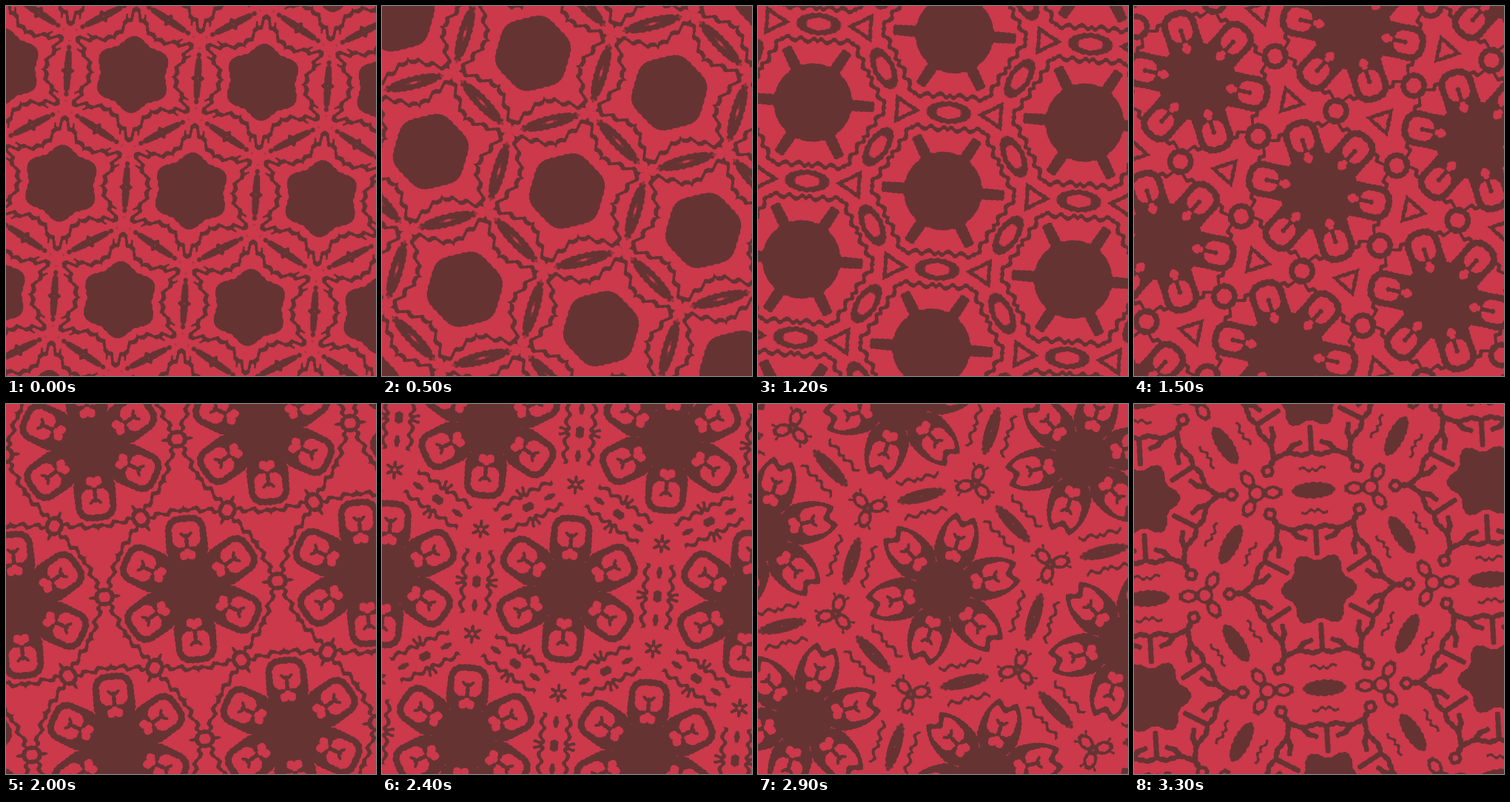
Animation, 500 px wide and 500 px high, one loop 3.4 s. Source, as an HTML page with a canvas:

```html
<!DOCTYPE html>
<html lang="en">
<head>
<meta charset="utf-8">
<title>Kaleidoscope</title>
<style>
html, body { margin: 0; width: 100%; height: 100%; overflow: hidden; background: #cb394b; }
canvas { display: block; width: 100%; height: 100%; }
</style>
</head>
<body>
<canvas id="stage" width="500" height="500"></canvas>
<script>
const SIZE = 500, LOOP = 3400, STEP = 100;
const LIGHT = [203, 57, 75], DARK = [102, 51, 51];
const ROOT3 = Math.sqrt(3), C30 = ROOT3 / 2;

// The mirror wedge is sampled on a grid, in units of the cell size.
const COLS = 180, H = .5 / COLS, W = COLS + 3, ROWS = Math.ceil(.2887 / H) + 3;
const field = new Float32Array(W * ROWS);

const { abs, hypot, max, min, sin, cos } = Math;
const clamp = (v, a, b) => min(b, max(a, v));

// Signed distances, negative inside.
const disc = (x, y, r) => hypot(x, y) - r;
const oval = (x, y, a, b) => (hypot(x / a, y / b) - 1) * min(a, b);
const outline = (d, w) => abs(d) - w / 2;
function box(x, y, a, b, round) {
  const dx = abs(x) - a + round, dy = abs(y) - b + round;
  return hypot(max(dx, 0), max(dy, 0)) + min(0, max(dx, dy)) - round;
}
function line(x, y, w, ...p) {
  let d = 1e3;
  for (let i = 0; i + 3 < p.length; i += 2) {
    const dx = p[i + 2] - p[i], dy = p[i + 3] - p[i + 1];
    const k = clamp(((x - p[i]) * dx + (y - p[i + 1]) * dy) / (dx * dx + dy * dy), 0, 1);
    d = min(d, hypot(x - p[i] - dx * k, y - p[i + 1] - dy * k));
  }
  return d - w / 2;
}

// Sizes that change with time.
function pose(t) {
  const ramp = (a, b) => clamp((t - a) / (b - a), 0, 1);
  const s = t / 1000;
  return {
    t,
    cell: 176 + 32 * s - 1.3 * s * s,
    turn: (3.4 + 25.2 * s + .9 * sin(s * Math.PI / 4) ** 2) * Math.PI / 180,
    body: 48 + 5 * ramp(0, 1200) - 15 * ramp(1500, 2900) + 7 * ramp(2900, 3300),
    lobe: 4 - 4 * ramp(0, 900) + 6 * ramp(2900, 3300),
    petal: 24 + 4 * ramp(1500, 2000),
    dent: 4 * ramp(2400, 2900),
    heart: 5 * ramp(1500, 2000),
    nodeA: 5 + 7 * ramp(0, 900) + 6 * ramp(900, 1500) - 4 * ramp(1500, 2000)
      - 8 * ramp(2000, 2400) + 5 * ramp(2400, 3300),
    nodeB: 36 + 6 * ramp(0, 900) - 24 * ramp(900, 1500) - 10 * ramp(1500, 2400)
      + 24 * ramp(2400, 2900) - 3 * ramp(2900, 3300),
    hole: .55 * ramp(300, 900) * (1 - ramp(2000, 2400)),
    waveX: 55 + 16 * ramp(0, 900) + 45 * ramp(900, 2000) - 11 * ramp(2000, 2400),
    slope: .48 - .88 * ramp(900, 1500) + .4 * ramp(2000, 2400),
    reach: 70 - 30 * ramp(0, 900) + 30 * ramp(900, 1500) - 26 * ramp(2000, 2400)
      - 26 * ramp(2400, 3300),
    waveW: 6 - 2 * ramp(2000, 3300),
    loop: 14 + 8 * ramp(2900, 3300)
  };
}

// x, y: toward a neighbour; r, s: along and off the 30 degree mirror;
// mx: from the cell edge; ty: from the three-fold corner.
function motif(x, y, p) {
  const r = x * C30 + y / 2, s = abs(x / 2 - y * C30);
  const mx = p.cell / 2 - x, ty = p.cell / 2 / ROOT3 - y;
  const corner = p.cell / ROOT3 - r;
  const during = (d, from, to) => d + max(0, from - p.t, p.t - to) / 12;
  let d = 1e3;
  const dark = (e, from = 0, to = LOOP) => { d = min(d, during(e, from, to)); };
  const light = (e, from = 0, to = LOOP) => { d = max(d, -during(e, from, to)); };

  // Wavy contour and the node on each cell edge.
  const bend = p.waveX + p.slope * y + 2.5 * sin(y * .35);
  dark(max((abs(x - bend) - p.waveW / 2) / hypot(1, p.slope), y - p.reach));
  dark(line(x, y, 3, 69, 26, 76, 29), 0, 200);
  dark(abs(mx) + abs(y) - 9, 0, 200);
  dark(oval(mx, y, p.nodeA, p.nodeB));
  light(oval(mx, y, max(.1, p.nodeA * p.hole), max(.1, p.nodeB * p.hole)));
  dark(line(mx, y, 4, 0, 0, 20, 0) + max(0, 13 - mx), 1900, 2100);
  dark(oval(mx, y - 32, 3.5, 9), 2300, 2450);
  dark(line(x, y, 4, 106, 3, 96, 4), 2300, 2500);

  // Corner: triangle, star, then a ring of loops.
  dark(outline(corner - 9, 5), 800, 1600);
  const star = Math.atan2(mx, ty);
  dark(disc(mx, ty, 9 + 4 * cos(6 * star)), 2350, 2450);
  light(disc(mx, ty, 2), 2350, 2450);
  dark(outline(oval(mx, ty - p.loop, 7, 11), 4), 2850);
  dark(line(mx, ty, 3, 5, p.loop + 6, 10, p.loop + 12), 2850, 2950);
  dark(outline(disc(mx, ty, 9), 4), 3250);

  // Centre, with drops that give way to petals.
  dark(disc(x, y, p.body - p.lobe * cos(6 * Math.atan2(y, x))));
  dark(max(s * .92 + (r - 104) * .38, 40 - r), 750, 1000);
  light(min(disc(r - 66, s, 8), max(s * .94 + (r - 90) * .3, 66 - r)), 750, 1000);
  const dent = p.dent * clamp((r - 70) / 20, 0, 1) * cos(s / 4);
  dark(box(r - 66, s, 34, p.petal, 20) + dent, 1400, 2950);
  light(box(r - 74, s, 17, p.petal - 9, 11) + dent, 1400, 2950);
  dark(line(r, s, 6, 50, 0, 73, 0), 1400, 2950);
  dark(line(r, s, 4, 69, 0, 76, 7), 1900, 2950);
  light(min(disc(r - 46, s - p.heart, 6), disc(r - 51, s, 4)), 1400, 2950);

  // Spokes, branches and knobs.
  dark(line(x, y, 7, 48, 0, 82, 0, 86, 12, 81, 32, 88, 50, 105, 61), 3250);
  dark(line(x, y, 7, 81, 32, 72, 25, 69, 15), 3250);
  dark(disc(r - 121, s, 9), 3250);
  light(disc(r - 121, s, 4), 3250);

  return d + .7 * sin(x * .6) * sin(y * .7 + 1);
}

function fill(p) {
  for (let j = 0; j < ROWS; j++)
    for (let i = 0; i < W; i++)
      field[j * W + i] = motif(i * H * p.cell, j * H * p.cell, p);
}

function sample(x, y) {
  const u = x / H, v = y / H, i = u | 0, j = v | 0, k = j * W + i;
  const fx = u - i, fy = v - j;
  const top = field[k] + (field[k + 1] - field[k]) * fx;
  const low = field[k + W] + (field[k + W + 1] - field[k + W]) * fx;
  return top + (low - top) * fy;
}

// Nearest lattice centre, then mirror into the wedge.
function fold(x, y) {
  let ax = x - Math.round(x), ay = y - ROOT3 * Math.round(y / ROOT3);
  const sx = x - .5, sy = y - C30;
  const bx = sx - Math.round(sx), by = sy - ROOT3 * Math.round(sy / ROOT3);
  if (bx * bx + by * by < ax * ax + ay * ay) { ax = bx; ay = by; }
  ax = abs(ax);
  ay = abs(ay);
  if (ay * ROOT3 > ax) {
    const mx = ax / 2 + ay * C30;
    ay = abs(ax * C30 - ay / 2);
    ax = mx;
  }
  return sample(ax, ay);
}

const ctx = document.getElementById('stage').getContext('2d');
const image = ctx.createImageData(SIZE, SIZE);

function draw(time) {
  const p = pose(time);
  fill(p);
  const c = cos(p.turn) / p.cell, n = sin(p.turn) / p.cell;
  const data = image.data;
  let i = 0;
  for (let y = 0; y < SIZE; y++) for (let x = 0; x < SIZE; x++) {
    const dx = x + .5 - 250, dy = y + .5 - 250;
    const ink = clamp(.5 - fold(dx * c + dy * n, dy * c - dx * n), 0, 1);
    for (let k = 0; k < 3; k++) data[i++] = LIGHT[k] + (DARK[k] - LIGHT[k]) * ink;
    data[i++] = 255;
  }
  ctx.putImageData(image, 0, 0);
}

const start = performance.now();
let shown = -1;
function tick() {
  const time = Math.floor((performance.now() - start) % LOOP / STEP) * STEP;
  if (time !== shown) draw(shown = time);
  requestAnimationFrame(tick);
}
tick();
</script>
</body>
</html>
```
